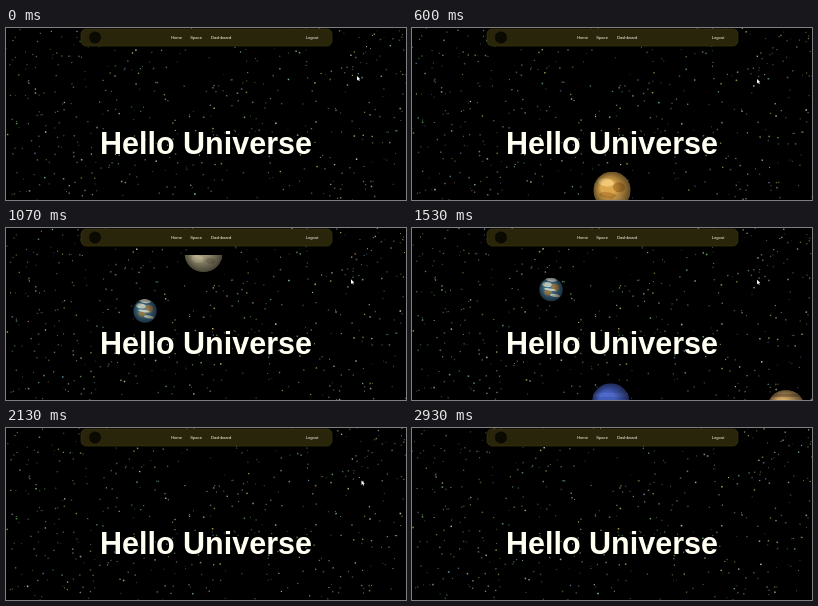
An HTML page with a canvas that plays this animation: 400x172 px, repeating every 3 s.

```html
<!DOCTYPE html>
<html lang="en">
<head>
<meta charset="utf-8">
<title>Hello Universe</title>
<style>
  html, body { margin: 0; width: 100%; height: 100%; overflow: hidden; background: #000; }
  canvas, svg { position: absolute; left: 0; top: 0; width: 400px; height: 172px; }
  text { font-family: "Liberation Sans", Arial, sans-serif; fill: #fffff2; }
  nav, .nav text { font-size: 4.15px; }
  .title { font-size: 30.5px; font-weight: bold; text-anchor: middle; }
</style>
</head>
<body>
<canvas id="sky" width="400" height="172"></canvas>
<svg viewBox="0 0 400 172">
  <g class="nav">
    <rect x="75" y="1" width="251" height="17" rx="5" fill="#29250a" stroke="#3b350d" stroke-width=".7"/>
    <circle cx="89" cy="9.5" r="6" fill="#0b0a02"/>
    <text x="165" y="11.3">Home</text>
    <text x="184.2" y="11.3">Space</text>
    <text x="205" y="11.3">Dashboard</text>
    <text x="299.7" y="11.3">Logout</text>
  </g>
  <text class="title" x="200" y="126">Hello Universe</text>
  <path id="cursor" d="M0 0V4.6L1.2 3.6L2 5.2L2.7 4.8L2 3.3H3.4Z" fill="#fff"/>
</svg>
<script>
const LOOP = 3000, W = 400, H = 172;
const ctx = document.getElementById('sky').getContext('2d');
const cursor = document.getElementById('cursor');

let seed = 41;
const rand = () => (seed = seed * 16807 % 2147483647) / 2147483647;

const tints = ['#a6f0d0', '#c4ee8c', '#f4f4dc', '#d8d66c', '#78b8d0', '#7cc878'];
const stars = Array.from({ length: 1100 }, () => ({
  radius: 220 * Math.sqrt(rand()),
  angle: rand() * Math.PI * 2,
  size: 0.8 + rand() * 0.8,
  light: 0.3 + rand() * 0.6,
  phase: rand() * Math.PI * 2,
  tint: tints[Math.floor(rand() * tints.length)]
}));

// y is the place on the page, bands are [offset, height, colour], spots are [x, y, rx, ry, colour]
const planets = [
  { x: 200, y: 201, r: 18.5, speed: 1, base: '#d9a64c',
    spots: [[-6, -8, 8, 4, '#f0c878'], [7, -3, 6, 5, '#b47c30'], [-4, 5, 9, 3, '#bf8636'], [8, 9, 7, 3, '#e0b05a']] },
  { x: 197.5, y: 373, r: 19, speed: 1, base: '#a09878',
    spots: [[-6, 6, 6, 4, '#b6ae8c'], [7, 8, 5, 3, '#8a8264'], [2, -6, 8, 4, '#887f62']] },
  { x: 139, y: 431, r: 11.7, speed: 1, base: '#3d6b88',
    spots: [[-4, -5, 5, 2.5, '#b8c4b8'], [4, -2, 4, 4, '#94794c'], [-3, 3, 4, 3, '#8c7a4c'],
      [4, 6, 5, 1.5, '#d4dccc'], [-1, 0, 6, 1.2, '#c4ccc0'], [0, -10, 6, 2, '#e4e8dc']] },
  { x: 198.7, y: 543.3, r: 18.5, speed: 1, base: '#425cba',
    bands: [[-9, 4, '#5068c8'], [1, 3, '#3c54ae'], [9, 4, '#5470c4']] },
  { x: 374, y: 526, r: 18.8, speed: 0.934, base: '#d2a868',
    bands: [[-15, 3, '#a88050'], [-9, 3, '#e8cc98'], [-6, 4, '#a86c34'], [0, 3, '#ecd4a4'],
      [4, 3, '#b87c3c'], [9, 2, '#e0bc84'], [13, 4, '#9c7444']],
    spots: [[7, 6, 4, 2, '#a85428']] }
];

const scrollKeys = [[0, 0], [400, 0], [600, 38], [1070, 348], [1530, 369], [1870, 513], [2300, 700], [3000, 720]];
const cursorX = [[0, 351], [600, 345], [1870, 345], [2470, 369], [2800, 404], [3000, 404]];
const cursorY = [[0, 48], [600, 51], [1870, 52], [2470, 53], [3000, 56]];

function track(keys, t) {
  const i = keys.findIndex(k => k[0] > t);
  const [t0, a] = keys[i - 1], [t1, b] = keys[i];
  return a + (b - a) * (t - t0) / (t1 - t0);
}

function drawStars(t) {
  for (const s of stars) {
    const a = s.angle + t * 0.000012;
    ctx.globalAlpha = s.light * (0.85 + 0.15 * Math.sin(t / LOOP * Math.PI * 4 + s.phase));
    ctx.fillStyle = s.tint;
    ctx.fillRect(W / 2 + s.radius * Math.cos(a), H / 2 + s.radius * Math.sin(a), s.size, s.size);
  }
  ctx.globalAlpha = 1;
}

function drawPlanet({ x, y, r, speed, base, bands = [], spots = [] }, scroll) {
  const top = y - scroll * speed;
  if (top < -r || top > H + r) return;
  ctx.save();
  ctx.translate(x, top);
  ctx.beginPath();
  ctx.arc(0, 0, r, 0, Math.PI * 2);
  ctx.clip();
  ctx.fillStyle = base;
  ctx.fillRect(-r, -r, 2 * r, 2 * r);
  for (const [dy, h, colour] of bands) {
    ctx.fillStyle = colour;
    ctx.fillRect(-r, dy, 2 * r, h);
  }
  for (const [sx, sy, rx, ry, colour] of spots) {
    ctx.fillStyle = colour;
    ctx.beginPath();
    ctx.ellipse(sx, sy, rx, ry, 0.15, 0, Math.PI * 2);
    ctx.fill();
  }
  const shade = ctx.createRadialGradient(-r * 0.2, -r * 0.15, r * 0.4, 0, 0, r * 1.05);
  shade.addColorStop(0, 'rgba(0,0,0,0)');
  shade.addColorStop(1, 'rgba(0,0,0,.6)');
  ctx.fillStyle = shade;
  ctx.fillRect(-r, -r, 2 * r, 2 * r);
  ctx.restore();
}

function frame(now) {
  const t = now % LOOP;
  ctx.fillStyle = '#000';
  ctx.fillRect(0, 0, W, H);
  drawStars(t);
  // Planets disappear behind the strip that holds the menu.
  ctx.save();
  ctx.beginPath();
  ctx.rect(0, 27, W, H - 27);
  ctx.clip();
  const scroll = track(scrollKeys, t);
  planets.forEach(p => drawPlanet(p, scroll));
  ctx.restore();
  cursor.setAttribute('transform', `translate(${track(cursorX, t)} ${track(cursorY, t)})`);
  requestAnimationFrame(() => frame(performance.now()));
}
frame(0);
</script>
</body>
</html>
```
